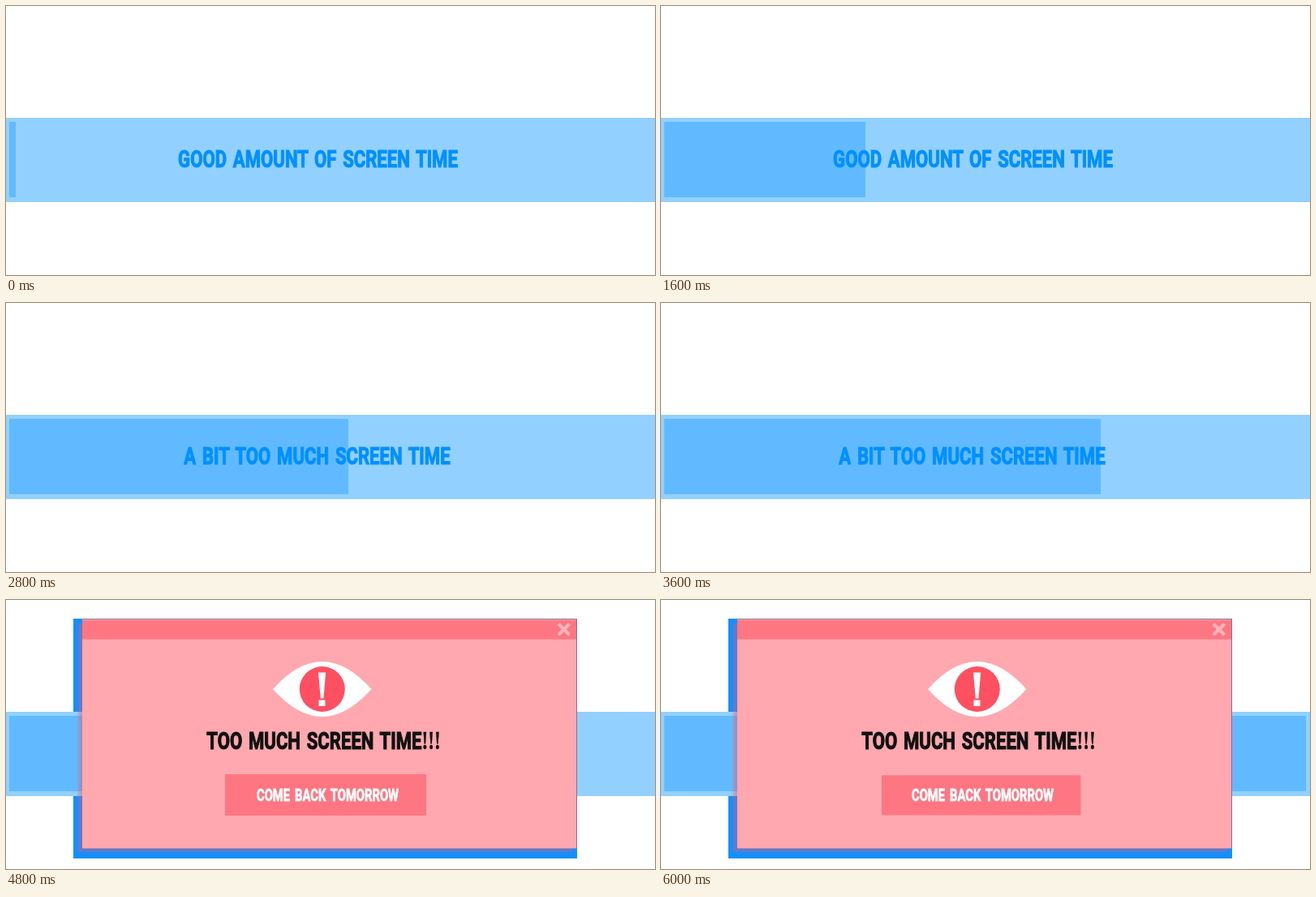
Write an HTML page that moves like this. It is 800 by 332 pixels and loops after 6.4 s.

```html
<!DOCTYPE html>
<html lang="en">
<head>
<meta charset="utf-8">
<title>Screen time</title>
<style>
  html, body { margin: 0; width: 100%; height: 100%; overflow: hidden; background: #fff; }
  svg { display: block; width: 100%; height: 100%; }

  text {
    font: bold 29.5px Roboto, sans-serif;
    text-anchor: middle;
    word-spacing: 3px;
    stroke-width: 1px;
    stroke-linejoin: miter;
    vector-effect: non-scaling-stroke;
  }
  .status { fill: #0090ff; stroke: #0090ff; }
  .title { fill: #111; stroke: #111; }
  .marks { font-family: "Liberation Serif", serif; font-size: 31px; stroke-width: .4px; }
  .label { fill: #fff; stroke: #fff; font-size: 19.7px; stroke-width: .7px; }

  /* The 1 ms lead keeps each step safely inside its own time slot. */
  .progress, .good, .much, .alert, .blink, .button {
    animation: 6400ms step-end -1ms infinite;
  }
  .progress { animation-name: progress; }
  .good { animation-name: good; }
  .much { animation-name: much; }
  .alert { animation-name: alert; }
  .blink { animation-name: blink; }
  .button { animation-name: blink, press; }

  @keyframes progress {
    0% { width: 8px; animation-timing-function: steps(12); }
    37.5% { width: 368px; animation-timing-function: step-end; }
    40.625% { width: 388px; animation-timing-function: steps(5); }
    56.25% { width: 538px; animation-timing-function: step-end; }
    75% { width: 688px; animation-timing-function: steps(3); }
    84.375% { width: 778px; animation-timing-function: step-end; }
    87.5%, 100% { width: 791px; }
  }
  @keyframes good {
    0% { visibility: visible; }
    37.5%, 100% { visibility: hidden; }
  }
  @keyframes much {
    0% { visibility: hidden; }
    37.5%, 100% { visibility: visible; }
  }
  @keyframes alert {
    0% { visibility: hidden; }
    62.5%, 100% { visibility: visible; }
  }
  @keyframes blink {
    0%, 62.5%, 68.75%, 78.125%, 84.375%, 90.625% { fill: #ff5061; }
    64.0625%, 75%, 81.25%, 87.5%, 92.1875%, 100% { fill: #ff7683; }
  }
  @keyframes press {
    0% { x: 270px; y: 215px; width: 248px; height: 51px; }
    93.75%, 100% { x: 272px; y: 216.3px; width: 245.4px; height: 49.2px; }
  }
</style>
</head>
<body>
<svg viewBox="0 0 800 332" preserveAspectRatio="none">
  <defs>
    <filter id="soft" x="-5%" y="-5%" width="110%" height="110%">
      <feGaussianBlur stdDeviation="1.5"/>
    </filter>
  </defs>

  <rect class="alert" x="83" y="23" width="621" height="296" fill="#128fff"/>

  <rect y="138" width="800" height="104" fill="#92d0ff"/>
  <rect class="progress" x="4" y="143" width="8" height="93" fill="#61baff"/>
  <text class="status good" transform="translate(384.5 198.5) scale(.75 1)">GOOD AMOUNT OF SCREEN TIME</text>
  <text class="status much" transform="translate(383.5 198.5) scale(.75 1)">A BIT TOO MUCH SCREEN TIME</text>

  <g class="alert">
    <rect x="89" y="29" width="609" height="282" fill="#e65a6e" opacity=".42" filter="url(#soft)"/>
    <path d="M94 23.5H703.5V307" fill="none" stroke="#8a7090"/>
    <rect x="94" y="24" width="609" height="282.5" fill="#ffa8af"/>
    <rect class="blink" x="94" y="25" width="609" height="23.5"/>
    <path d="M681 29.5l13.5 13.5M694.5 29.5l-13.5 13.5" stroke="#ffb4ba" stroke-width="4.2"/>

    <path d="M329 110Q389.7 42 450.5 110Q389.7 178 329 110Z" fill="#fff"/>
    <circle cx="389.8" cy="110" r="28" fill="#ff5061"/>
    <path d="M385 89.5h9.2l-2.8 32h-3.6ZM385.5 123.5h8v7.5h-8Z" fill="#fff"/>

    <text class="title" transform="translate(391.5 183.8) scale(.75 1)">TOO MUCH SCREEN TIME<tspan class="marks">!!!</tspan></text>
    <rect class="button" x="270" y="215" width="248" height="51"/>
    <text class="label" transform="translate(396.5 247.5) scale(.75 1)">COME BACK TOMORROW</text>
  </g>
</svg>
</body>
</html>
```
